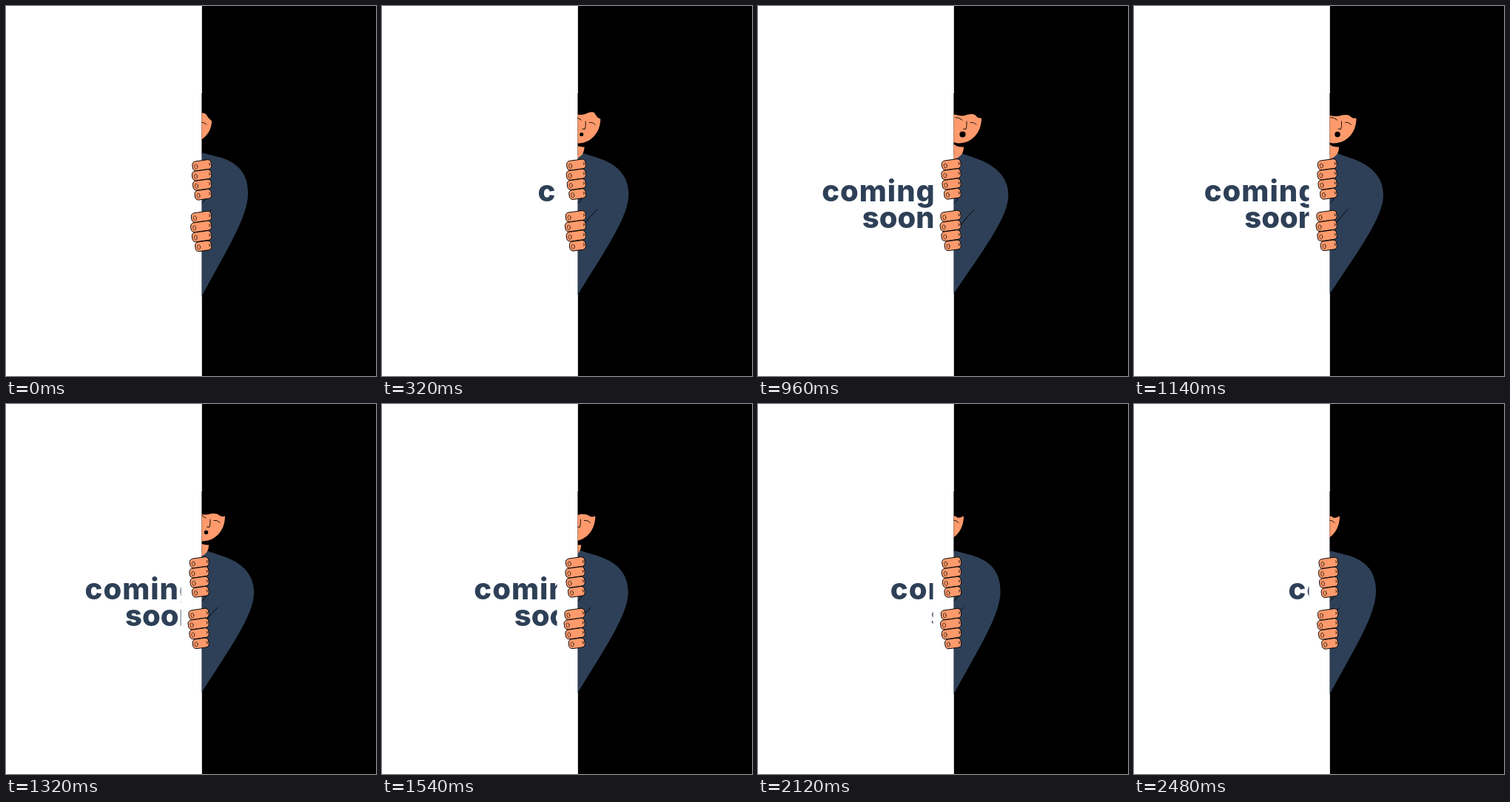
Recreate the animation shown at these times as an HTML page. Size 500x500 px, loop 2.5 s.

```html
<!DOCTYPE html>
<html lang="en">
<head>
<meta charset="utf-8">
<title>Coming soon</title>
<style>
  html, body { margin: 0; width: 100%; height: 100%; overflow: hidden; background: #fff; }
  svg { display: block; width: 100%; height: 100%; }
  text { font: 800 40px Inter, sans-serif; fill: #2e4057; }
  .wide { letter-spacing: 1px; }
  .skin { fill: #ff9a6c; }
  .line { fill: none; stroke: #000; stroke-width: .9; stroke-linecap: round; stroke-linejoin: round; }
  .finger { stroke: #000; stroke-width: .9; }
  .nail { stroke-width: .6; }
</style>
</head>
<body>
<svg viewBox="0 0 500 500">
  <clipPath id="doorway"><rect x="264.5" width="236" height="500"/></clipPath>
  <clipPath id="wall"><rect width="236.5" height="500"/></clipPath>
  <rect width="500" height="500" fill="#fff"/>
  <rect x="264.8" width="236" height="500"/>
  <g clip-path="url(#doorway)">
    <rect id="hair" x="260" y="118" width="10" height="82"/>
    <path id="body" fill="#2e4057"/>
    <path class="line" d="M265 266Q268 264 271 259"/>
    <path id="fold" class="line" d="M0 0Q-8 7 -20 23"/>
    <path id="neck" class="skin" d="M245 180L265 187Q270 191 278 190.5Q278 203 265 207L245 207Z"/>
    <g id="head">
      <path id="face" class="skin"/>
      <path class="line" d="M282 156Q282.5 162 281 166.5L277.5 166M287 157.5Q292 156.5 295 160.5M267 150.5Q272 150.5 276 154"/>
      <circle id="mouth" cx="276.5" cy="173.5"/>
    </g>
  </g>
  <g clip-path="url(#wall)">
    <g id="words"><text class="wide" x="-1.5" y="264">coming</text><text x="53" y="300">soon</text></g>
  </g>
  <g id="hands"></g>
</svg>
<script>
const LOOP = 2500;
const el = id => document.getElementById(id);
const mix = (a, b, k) => a + (b - a) * k;
const clamp = u => Math.min(1, Math.max(0, u));

// Eased 0 to 1, beginning at start and lasting span
const ease = (t, start, span) => (1 - Math.cos(Math.PI * clamp((t - start) / span))) / 2;
// Rises from the loop start, then falls back
const peek = (t, rise, start, fall) => ease(t, 0, rise) * (1 - ease(t, start, fall));

function finger(left, y) {
  const width = 277.5 - left, half = width / 2;
  return `<g transform="translate(${left + half} ${y}) rotate(-8)">
    <rect class="skin finger" x="${-half}" y="-6.4" width="${width}" height="12.8" rx="4.5"/>
    <ellipse class="line nail" cx="${4.7 - half}" cy=".6" rx="2" ry="3.2"/>
    <path class="line" d="M${half - 2.5} -1.5q1.5 1.5 0 3"/></g>`;
}

function hand(left, top, curl) {
  let fingers = '';
  for (let i = 0; i < 4; i++) fingers += finger(left + curl * (i - .8) ** 2, top + 13.2 * i);
  return fingers;
}

el('hands').innerHTML = hand(251.5, 215.2, .75) + hand(249.7, 284.8, 1.25);

function draw(t) {
  const lean = peek(t, 640, 620, 1740);
  const turn = peek(t, 500, 973, 1040);
  const elbow = peek(t, 500, 530, 1520);
  const grip = peek(t, 540, 1800, 1450);
  const settle = 2 * (1 - ease(t, 0, 500));
  const fringe = settle + 10 * (1 - (1 - clamp((t - 560) / 1920)) ** 2);

  const b = (from, to) => mix(from, to, lean);
  const right = b(327, 339.5);
  el('body').setAttribute('d', `M264 ${b(198, 195)}L${b(285, 292)} ${b(203.5, 205)}
    C${b(312, 322)} ${b(210, 215)} ${right} ${b(225, 232)} ${right} ${b(253, 256)}
    C${right} 285 ${b(298, 305)} 330 264 ${b(393, 389)}Z`);
  el('face').setAttribute('d', `M240 ${144 + fringe}L265 ${144 + fringe * .7}
    Q276 ${149 + fringe * .3} 283 ${145 + fringe * .5}Q291 ${141 + fringe} 294 ${144 + fringe}
    Q297 ${151 + fringe * .3} 302 ${151.5 + 2 * settle}C302 171 289 186 270 185.5L240 178Z`);
  el('mouth').setAttribute('r', 1 + 3.1 * turn ** 2);

  const move = (id, x, y = 0) => el(id).setAttribute('transform', `translate(${x} ${y})`);
  move('head', 24 * (turn - 1));
  move('neck', 15.6 * (turn - 1));
  move('fold', mix(277.5, 296, elbow), 275);
  move('hands', -3.5 * grip, -grip);
  move('words', 81.5 + 158 * (1 - ease(t, 225, 350)) + 152 * ease(t, 640, 2480));
}

function tick() {
  draw(performance.now() % LOOP);
  requestAnimationFrame(tick);
}
tick();
</script>
</body>
</html>
```
